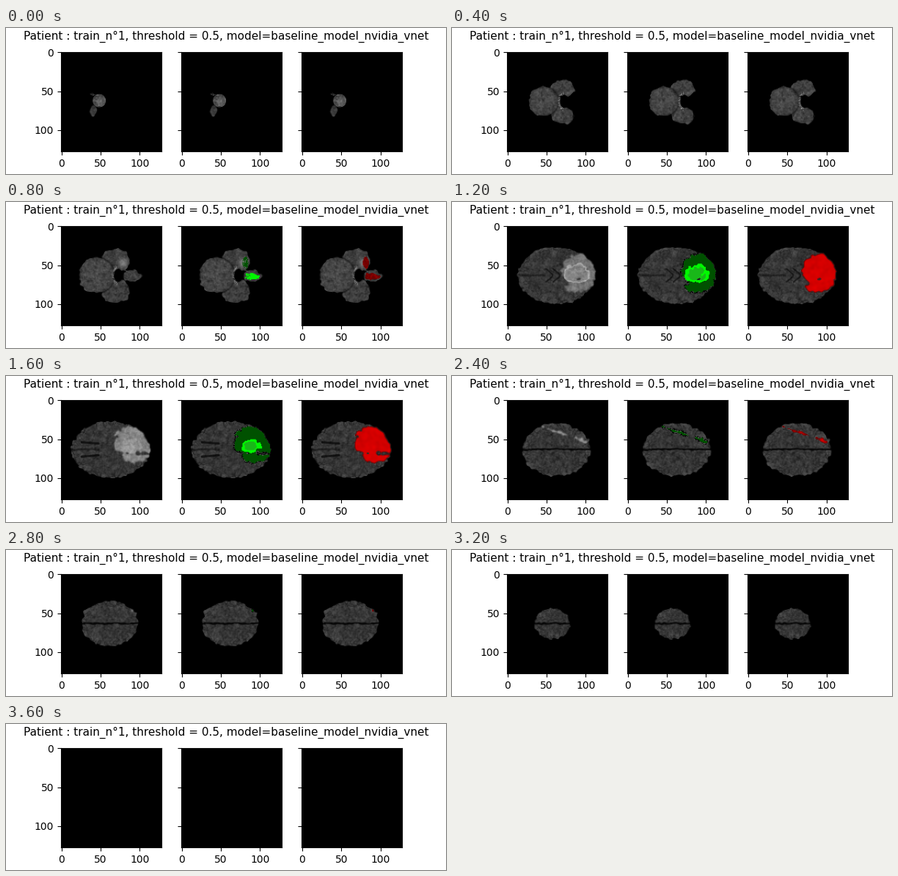
A matplotlib script that plays this animation: 600x200 px, repeating every 4000 ms.

```python
import numpy as np
import matplotlib.pyplot as plt
from matplotlib.animation import FuncAnimation

FRAMES, STEP, N = 20, 200, 128
BASE_END, TOP = 4, 17   # last skull-base slice, last slice with tissue
TITLE = "Patient : train_n°1, threshold = 0.5, model=baseline_model_nvidia_vnet"

# Geometry is written in stage pixels of the left panel.
CELL = 136.765 / N
X, Y = np.meshgrid(75 + (np.arange(N) + 0.5) * CELL,
                   32.6 + (np.arange(N) + 0.5) * CELL)
MID = 101


def blur(a, *sigma):
    """Gaussian blur along every axis."""
    f = np.fft.fftn(a)
    for axis, s in enumerate(sigma):
        shape = [1] * a.ndim
        shape[axis] = -1
        q = np.fft.fftfreq(a.shape[axis]).reshape(shape)
        f = f * np.exp(-2 * (np.pi * s * q) ** 2)
    return np.fft.ifftn(f).real


def noise(rng, *sigma):
    a = blur(rng.standard_normal((FRAMES, N, N)), *sigma)
    return a / a.std()


rng = np.random.default_rng(7)
rough = noise(rng, 0.4, 0.7, 0.7)
folds = noise(rng, 0.7, 1.7, 1.7)
grain = rng.random((FRAMES, N, N))


def clip01(a):
    return np.clip(a, 0, 1)


def cover(d):
    return clip01(d + 0.5)


def dome(k, mid, half, p=2):
    """Relative radius of a rounded solid cut at slice k."""
    return np.sqrt(max(0, 1 - abs((k - mid) / half) ** p))


def bell(k, mid, width):
    return np.exp(-((k - mid) / width) ** 2)


def ellipse(cx, cy, rx, ry, p=2):
    """Approximate inner distance to the edge of a (super)ellipse."""
    rx, ry = max(rx, 0.01), max(ry, 0.01)
    r = (np.abs((X - cx) / rx) ** p + np.abs((Y - cy) / ry) ** p) ** (1 / p)
    return (1 - r) * min(rx, ry)


def segment(ax, ay, bx, by, width):
    dx, dy = bx - ax, by - ay
    t = clip01(((X - ax) * dx + (Y - ay) * dy) / (dx * dx + dy * dy))
    return cover(width - np.hypot(X - ax - t * dx, Y - ay - t * dy))


def lesion(k):
    """Mask of the lesion in slice k."""
    if k < BASE_END:
        return np.zeros((N, N), bool)
    if k == BASE_END:
        d = np.maximum(ellipse(163, 84, 4.2, 7.5), ellipse(172, 102.5, 11, 4.5))
        return d + 0.8 * folds[k] > 0
    tilt = 0.06 * (k - 6) * (X - 172)
    d = ellipse(172, 98 - 1.8 * (k - 6) + tilt, 24 * dome(k, 7.3, 5),
                26 * dome(k, 6, 5.1), 2.4)
    notch = ellipse(149, 109, 10, 7)
    slit = ellipse(185, 106.5, 13, 2.2 * bell(k, 8, 1.2))
    d = np.minimum(d, -np.maximum(notch, slit))
    return d + 1.1 * folds[k] > 0


def core(k):
    """Inner distance to the edge of the lesion's bright core."""
    if not BASE_END <= k < 10:
        return np.full((N, N), -9.0)
    d = ellipse(170, 104 - k, 16 * dome(k, 6.3, 3.7),
                12.5 * dome(k, 6, 3.7) ** 2)
    return d + 1.1 * folds[k]


def first_tip():
    """The lowest slice: a small disc with a tail."""
    disc = cover(ellipse(127, 100, 9, 9)) * (78 + 13 * rough[0] + 9 * folds[0])
    tail = cover(ellipse(119, 113.5, 4.6, 8.5) + 0.5 * folds[0])
    dots = (ellipse(118.5, 91, 3.5, 2.2) > 0) & (grain[0] > 0.45)
    return np.maximum(disc, np.maximum(tail * (56 + 6 * rough[0]), dots * 48))


def skull_base(k):
    """Cerebellum with two temporal lobes, growing slice by slice."""
    n = k - 1
    r = 18 + 2.2 * n
    cb = ellipse(126 - 0.8 * n, MID, r, r)
    rx, ry, reach = 14 + 1.8 * n, 9 + 2.5 * n, 25.5 + 3.9 * n
    lobes = [ellipse(165 + 1.2 * n - rx, 101.5 + side * (reach - ry), rx, ry)
             for side in (-1, 1)]
    body = np.maximum.reduce([cb, *lobes, ellipse(138, MID, 12, 14)])
    hole = np.maximum(ellipse(153, MID, 6, 9), ellipse(159, MID, 10, 6))
    g = 62 + 7 * rough[k] + 4 * folds[k] + 7 * cover(cb - 3)
    g = g * (1 - 0.4 * bell(cb, 0, 1.2) * (X > 118))
    glow = bell(hole, -1.5, 1.3) * (X < 152) * (grain[k] > 0.5)
    g = g * (1 - cover(hole)) + 75 * glow
    if k == BASE_END:
        lobe = ellipse(172, 102, 12.5, 8)
        g = np.where(lobe > 0, 64 + 8 * rough[k], g)
        body = np.maximum(body, lobe)
    return g * cover(body + 0.8 * folds[k])


def cerebrum(k):
    """Upper slices: an ovoid with folds, fissure and ventricles."""
    d = ellipse(142.5 - 10 * ((k - 7) / 10) ** 5, 101.3,
                53.5 * dome(k, 7, 10.15), 39 * dome(k, 7, 10.3, 2.6))
    d = d + 0.7 * folds[k] - 0.4
    depth = clip01(1 - d / 15)
    sulci = bell(folds[k], 0, 0.3)
    g = 54 + 6 * rough[k] + 4 * folds[k]
    g = g * (1 - 0.5 * sulci * depth) + 7 * depth

    line = cover(1.1 - np.abs(Y - MID + 0.4 * folds[k]))
    if k < 12:
        line = line * (0.5 * (X < 127) + 0.8 * (X > 185))
    g = g * (1 - 0.9 * line)

    wide, flat = bell(k, 10.3, 1.3), bell(k, 7.8, 1.2)
    for side in (-1, 1):
        for a, da, b, db in ((131, 9, 142, 2), (142, 2, 159, 5)):
            g = g * (1 - 0.9 * wide * segment(a, MID + side * da,
                                              b, MID + side * db, 1.7))
        g = g * (1 - 0.65 * flat * segment(103, MID + side * 10,
                                           126, MID + side * 8, 1.6))
        # chevrons of the midbrain
        for x in (128, 138):
            g = g * (1 - 0.5 * bell(k, 6, 1) * segment(
                x, MID + side * 9, x + 9, MID + side, 1))
    return g * cover(d)


def anatomy(k):
    if k == 0:
        return first_tip()
    return skull_base(k) if k <= BASE_END else cerebrum(k)


def light_lesion(k, grey, mask, heart):
    """Brighten the lesion in the plain scan."""
    if k == BASE_END:
        patch = bell(X, 160, 6) * bell(Y, 84, 6)
        return grey + 65 * patch * (grey > 8)
    w = clip01(blur(mask * 1.0, 0.8, 0.8))
    tone = min(138, 105 + 9 * (k - 5)) + 6 * rough[k] + 6 * folds[k]
    ring = bell(heart, 0, 1) * mask
    return (grey * (1 - w) + tone * w + 60 * bell(k, 6.3, 1.6) * ring
            + 15 * cover(heart - 1))


def paint_truth(k, img, mask, heart, edge):
    """Dim green lesion with a bright core."""
    base = k == BASE_END
    dim, bright = mask, heart > 0
    if base:
        dim = mask & (Y < 94) & (grain[k] > 0.3)
        bright = bright & (X > 162) & ((X > 169) | (grain[k] > 0.35))
    else:
        img[edge & (grain[k] > 0.45)] *= 0.12
    img[dim] = (0, 0.32, 0)
    img[bright] = (0, 0.98, 0)
    if not base:
        img[(heart > 3.2) & (folds[k] > -0.7)] = (0.1, 0.72, 0.1)


def paint_guess(k, img, mask, soft, edge):
    """Red prediction that darkens towards its edge."""
    value = 0.42 + 0.41 * clip01((soft - 0.42) * 2.6) + 0.02 * folds[k]
    if k == BASE_END:
        value = 0.47 + 0.05 * rough[k]
    red = np.stack([value, 0 * value, 0 * value], axis=2)
    fringe = edge & (soft > 0.25)
    img[fringe] = img[fringe] * 0.5 + np.array([0.12, 0, 0])
    img[mask] = red[mask]


def render(k):
    """The three panels of slice k as RGB arrays."""
    if k > TOP:
        return [np.zeros((N, N, 3))] * 3
    grey = anatomy(k)
    inside = blur((grey > 8) * 1.0, 1, 1) > 0.4
    mask = lesion(k) & inside
    soft = blur(mask * 1.0, 1.6, 1.6)
    edge = (soft > 0.12) & ~mask & (k > BASE_END)
    heart = np.where(mask, core(k), -9)
    if mask.any():
        grey = light_lesion(k, grey, mask, heart)

    plain = np.repeat(clip01(grey / 255)[..., None], 3, axis=2)
    green, red = plain.copy(), plain.copy()
    paint_truth(k, green, mask, heart, edge)
    paint_guess(k, red, mask, soft, edge)
    return [plain, clip01(green), clip01(red)]


SLICES = [render(k) for k in range(FRAMES)]

fig, axes = plt.subplots(1, 3, figsize=(6, 2), dpi=100,
                         sharex=True, sharey=True)
fig.suptitle(TITLE, fontsize=11)
views = [ax.imshow(img) for ax, img in zip(axes, SLICES[0])]


def draw(k):
    for view, img in zip(views, SLICES[k]):
        view.set_data(img)
    return views


anim = FuncAnimation(fig, draw, frames=FRAMES, interval=STEP, repeat=True)
plt.show()
```
